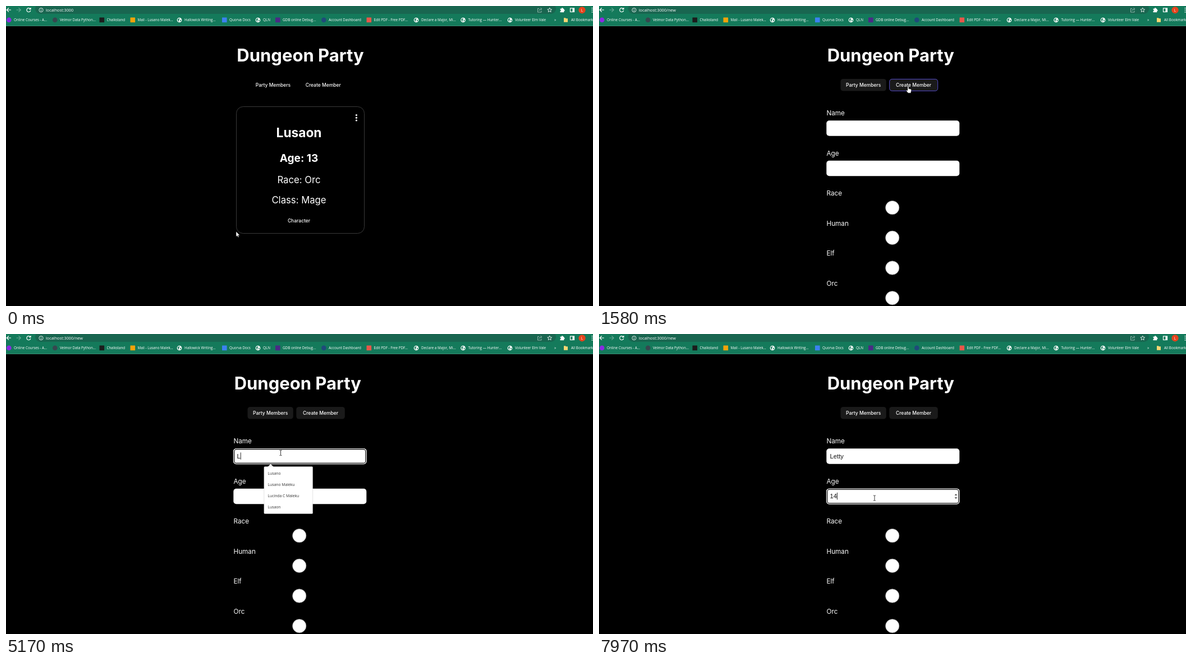
An HTML page that plays this animation: 1046 px wide and 535 px high, repeating every 8000 ms.

```html
<!DOCTYPE html>
<html lang="en">
<head>
<meta charset="utf-8">
<title>Dungeon Party</title>
<style>
  html, body { margin: 0; width: 100%; height: 100%; overflow: hidden; background: #000; }
  svg { display: block; width: 1046px; height: 535px; }
  text { fill: #fff; font-family: Inter, sans-serif; font-optical-sizing: none; white-space: pre; }
  .mid { text-anchor: middle; }
  .title { font-size: 31px; font-weight: 700; }
  .name { font-size: 22.7px; font-weight: 700; }
  .age { font-size: 19px; font-weight: 700; }
  .fact { font-size: 16.7px; }
  .btn { font-size: 8.5px; font-weight: 500; }
  .label { font-size: 11.7px; }
  .ui { font-family: "Open Sans", sans-serif; font-size: 6.3px; font-weight: 500; }
  .url { font-family: "Open Sans", sans-serif; font-size: 7.3px; font-weight: 500; }
  .row { font-family: "Open Sans", sans-serif; font-size: 6.8px; fill: #333; }
  .value { font-family: "Liberation Sans", Arial, sans-serif; font-size: 11.2px; fill: #111; }
  .line { fill: none; stroke: #fff; stroke-width: 1.2; }
  .thin { stroke-width: .85; }
</style>
</head>
<body>
<svg viewBox="0 0 1046 535" xmlns="http://www.w3.org/2000/svg">
  <defs>
    <g id="globe">
      <circle r="4.3" fill="#fff"/>
      <path d="M-3.2-1.5Q-1-3.4 .8-2.6L-.2-.8-1.6-.2-.6 1-1 3.2Q-3.4 1.6-3.2-1.5M1.2 0L3.2-.6 2.6 1.8 1 2.4Z" fill="#147a5b"/>
    </g>
  </defs>

  <g id="chrome">
    <rect width="1046" height="36" fill="#147a5b"/>
    <rect x="52" y="-4" width="928" height="18" rx="9" fill="#196650"/>
    <path d="M0 35.5H1046" stroke="#43917a" stroke-width=".8"/>
    <path class="line" d="M9 7H1.5M5 3.3L1.3 7 5 10.7"/>
    <path class="line" d="M18.5 7H26M22.5 3.3L26.2 7 22.5 10.7" opacity=".35"/>
    <path class="line" d="M43.2 5A3.5 3.5 0 1 0 43.8 8M44 3V5.6H41.2"/>
    <g class="line thin">
      <circle cx="62.5" cy="7.2" r="3.6"/><path d="M62.5 6.6V9.3M62.5 4.8V5.7"/>
    </g>
    <path class="line thin" opacity=".6" d="M950 4.5H947.5V11H954V8.5M949.8 8.5Q950 5.5 953.5 5.3M952.5 3.2L955 5.3 952.5 7.4"/>
    <path class="line thin" d="M968.7 3.2L969.8 5.8 972.6 6 970.5 7.9 971.1 10.7 968.7 9.2 966.3 10.7 966.9 7.9 964.8 6 967.6 5.8Z"/>
    <path fill="#fff" d="M987.5 4.7H989.8A1.4 1.4 0 0 1 992.6 4.7H994.2V6.5A1.4 1.4 0 0 1 994.2 9.3V11.2H987.5V9A1.3 1.3 0 0 0 987.5 6.4Z"/>
    <rect class="line" x="1005.5" y="4" width="7" height="6.5"/>
    <path fill="#fff" d="M1009.5 4H1012.5V10.5H1009.5Z"/>
    <circle cx="1026.5" cy="7.3" r="6.1" fill="#e5431d"/>
    <text class="ui mid" x="1026.5" y="9.6">L</text>
    <path stroke="#fff" stroke-width="1.6" d="M1044.5 3V4.6M1044.5 6.5V8.1M1044.5 10V11.6"/>
    <text id="url" class="url" x="71" y="9.8"></text>
    <text class="ui" x="977" y="27">»</text>
    <path fill="#f7d774" d="M994 21.3H997L998 22.3H1001V28.7H994Z"/>
  </g>

  <g id="party"></g>
  <g id="form"></g>
  <g id="arrow"><path d="M0 0V9.4L2.1 7.5 3.5 10.6 5 9.9 3.7 7H6.5Z" fill="#fff" stroke="#000" stroke-width=".5"/></g>
  <g id="hand"><path d="M-.6 1Q.4-.6 1.4 1V5L5.2 5.8Q6.4 6.2 6.1 8L5.2 12.7H.2L-3 8.6Q-2.9 6.8-.6 8.2Z" fill="#fff" stroke="#000" stroke-width=".5"/></g>
  <g id="beam"><path d="M-2-4.6H-.6L0-4 .6-4.6H2M0-4V4M-2 4.6H-.6L0 4 .6 4.6H2" fill="none" stroke="#222" stroke-width=".9"/></g>
</svg>

<script>
const LOOP = 8000;
const $ = id => document.getElementById(id);
const show = (id, on) => { $(id).style.display = on ? '' : 'none'; };

const text = (cls, x, y, value) => `<text class="${cls}" x="${x}" y="${y}">${value}</text>`;
const box = (x, y, w, h, r, attrs) =>
  `<rect x="${x}" y="${y}" width="${w}" height="${h}" rx="${r}" ${attrs}/>`;
const button = (x, y, w, label, id, filled = true) =>
  `<g><g id="${id}">${filled ? box(x, y, w, 21.5, 4.5, 'fill="#1a1a1a"') : ''}</g>` +
  text('btn mid', x + w / 2, y + 14, label) + '</g>';
const border = (x, id) =>
  box(x + .4, 130.4, 86, 21, 4.5, `id="${id}" fill="none" stroke="#5b51dc" stroke-width=".9"`);

// Bookmarks: text position, label, and a plain icon colour (none means a globe).
const bookmarks = [
  [14, 'Online Courses - A...', '#8a2be2', 1], [96, 'Velmor Data Python...', '#37474f', 1],
  [179.5, 'Chalkstand', '#1c1c1c'], [234.5, 'Mail - Lusano Malek...', '#f0a30a'],
  [318, 'Hallowick Writing...'], [398, 'Quorva Docs', '#3b82f0'], [458, 'QLN'],
  [493, 'GDB online Debug...', '#4b2a86'], [575, 'Account Dashboard', '#1f4a7a', 1],
  [655.5, 'Edit PDF - Free PDF...', '#e8574a'], [740, 'Declare a Major, Mi...'],
  [823.5, 'Tutoring — Hunter...'], [907, 'Volunteer Elm Vale'], [1007, 'All Bookmarks', 'none']
];
$('chrome').insertAdjacentHTML('beforeend', bookmarks.map(([x, label, color, round]) =>
  (color ? box(x - 13, 20.6, 8.6, 8.6, round ? 4.3 : .5, `fill="${color}"`)
         : `<use href="#globe" x="${x - 9}" y="25"/>`) + text('ui', x, 27.2, label)).join(''));

$('party').innerHTML =
  text('title mid', 524.5, 99, 'Dungeon Party') +
  button(435.5, 130, 81, 'Party Members', 'membersFill', false) +
  button(522, 130, 86.5, 'Create Member', 'createFill') + border(522, 'createBorder') +
  box(410.5, 179.5, 228, 226, 12, 'fill="none" stroke="#404040" stroke-width=".9"') +
  [194.6, 199.3, 204].map(y => `<circle cx="624.4" cy="${y}" r="1.6" fill="#fff"/>`).join('') +
  text('name mid', 522, 234, 'Lusaon') +
  text('age mid', 522, 278, 'Age: 13') +
  text('fact mid', 522, 316, 'Race: Orc') +
  text('fact mid', 522, 351.5, 'Class: Mage') +
  button(488.7, 372.4, 66.6, 'Character', 'characterFill');

const field = (y, id) =>
  box(405.3, y, 237, 27.5, 5, 'fill="#fff"') +
  `<g id="${id}Ring">` + box(404.9, y - .4, 237.8, 28.3, 5.4, 'fill="#fff"') +
  box(406.7, y + 1.4, 234.2, 24.7, 4, 'fill="#fff" stroke="#000" stroke-width="1.2"') + '</g>' +
  text('value', 411.6, y + 17.2, `<tspan id="${id}Value"></tspan>`) +
  `<path id="${id}Caret" stroke="#111" stroke-width=".9"/>`;

const popup = (id, rows) => {
  const height = rows.length * 20 + 4;
  return `<g id="${id}"><path d="M466 237L471.5 232 477 237Z" fill="#fff"/>` +
    box(459.8, 236.5, 86.8, height, 1.5, 'fill="#fff" stroke="#bbb" stroke-width=".4"') +
    rows.map((r, i) => text('row', 466.5, 251.2 + i * 20, r)).join('') + '</g>';
};

$('form').innerHTML =
  text('title mid', 519.8, 99, 'Dungeon Party') +
  button(430.5, 130, 81.3, 'Party Members', 'membersTab') +
  button(517.3, 130, 86.5, 'Create Member', 'createTab') + border(517.3, 'tabBorder') +
  ['Name', 'Age', 'Race'].map((s, i) => text('label', 405.5, 195 + i * 71.6, s)).join('') +
  ['Human', 'Elf', 'Orc'].map((s, i) => text('label', 405.5, 391.6 + i * 53.8, s)).join('') +
  [0, 1, 2, 3].map(i => `<circle cx="522.7" cy="${359.6 + i * 53.7}" r="12.2" fill="#fff" stroke="#888" stroke-width=".7"/>`).join('') +
  field(204.3, 'name') + field(275.8, 'age') +
  '<path id="spinner" d="M633.7 287.8L636 285 638.3 287.8ZM633.7 291.2L636 294 638.3 291.2Z" fill="#444"/>' +
  popup('allNames', ['Lusano', 'Contemprato', 'Lusano Maleku', 'a', 'Lucinda C Maleku', 'Henrietta C Maleku']) +
  popup('matches', ['Lusano', 'Lusano Maleku', 'Lucinda C Maleku', 'Lusaon']);

// Each track holds [start time, value...]; the latest started entry applies.
const pointer = [
  [0, 'arrow', 410, 402], [120, 'arrow', 425, 390], [260, 'hand', 512, 376],
  [380, 'arrow', 612.5, 136], [530, 'arrow', 582, 122], [650, 'hand', 551.5, 135],
  [770, 'hand', 551, 148.5], [920, 'hand', 550.5, 145], [1190, 'hand', 550.5, 142.5],
  [1830, 'arrow', 515, 183], [1980, 'arrow', 496, 202], [2100, 'beam', 489.5, 212],
  [6730, 'arrow', 466, 314], [6880, 'arrow', 457, 338], [7000, 'arrow', 468, 308],
  [7120, 'beam', 485, 296], [7270, 'beam', 490, 292], [7670, 'beam', 491, 292.6]
];
const nameTyped = [[0, ''], [5170, 'L'], [5410, 'Le'], [5810, 'Let'], [5930, 'Lett'], [6050, 'Letty']];
const ageTyped = [[0, ''], [7820, '1'], [7970, '14']];
const nameCaret = [[0, 0], [2250, 1], [2770, 0], [3330, 1], [3910, 0], [4430, 1], [4890, 0],
  [5170, 1], [6580, 0], [6730, 1], [7120, 0]];

const at = (track, t) => track.findLast(entry => entry[0] <= t).slice(1);
const within = (t, from, to) => t >= from && t < to;

function setField(id, y, value, caret) {
  const node = $(id + 'Value');
  if (node.textContent !== value) node.textContent = value;
  const x = 412 + (value ? node.getComputedTextLength() : 0);
  $(id + 'Caret').setAttribute('d', `M${x} ${y}V${y + 12.6}`);
  show(id + 'Caret', caret);
}

function draw(t) {
  const onForm = t >= 1580;
  $('url').textContent = 'localhost:3000' + (onForm ? '/new' : '');
  show('party', !onForm);
  show('form', onForm);
  show('characterFill', t >= 260);
  show('createFill', t >= 380);
  show('createBorder', t >= 770);
  show('tabBorder', t < 1980);

  show('nameRing', within(t, 2250, 7120));
  show('ageRing', t >= 7120);
  show('spinner', t >= 7120);
  show('allNames', within(t, 2400, 5170));
  show('matches', within(t, 5170, 5530));
  const fading = t >= 5410;
  $('matches').setAttribute('opacity', fading ? .33 : 1);
  $('matches').setAttribute('transform', fading ? 'translate(503 278.5) scale(.97) translate(-503 -278.5)' : '');
  if (onForm) {
    setField('name', 211.3, at(nameTyped, t)[0], at(nameCaret, t)[0]);
    setField('age', 282.8, at(ageTyped, t)[0], t >= 7120);
  }

  const [kind, x, y] = at(pointer, t);
  for (const id of ['arrow', 'hand', 'beam']) show(id, id === kind);
  $(kind).setAttribute('transform', `translate(${x} ${y})`);
}

const start = performance.now();
function tick() {
  draw((performance.now() - start) % LOOP);
  requestAnimationFrame(tick);
}
tick();
</script>
</body>
</html>
```
